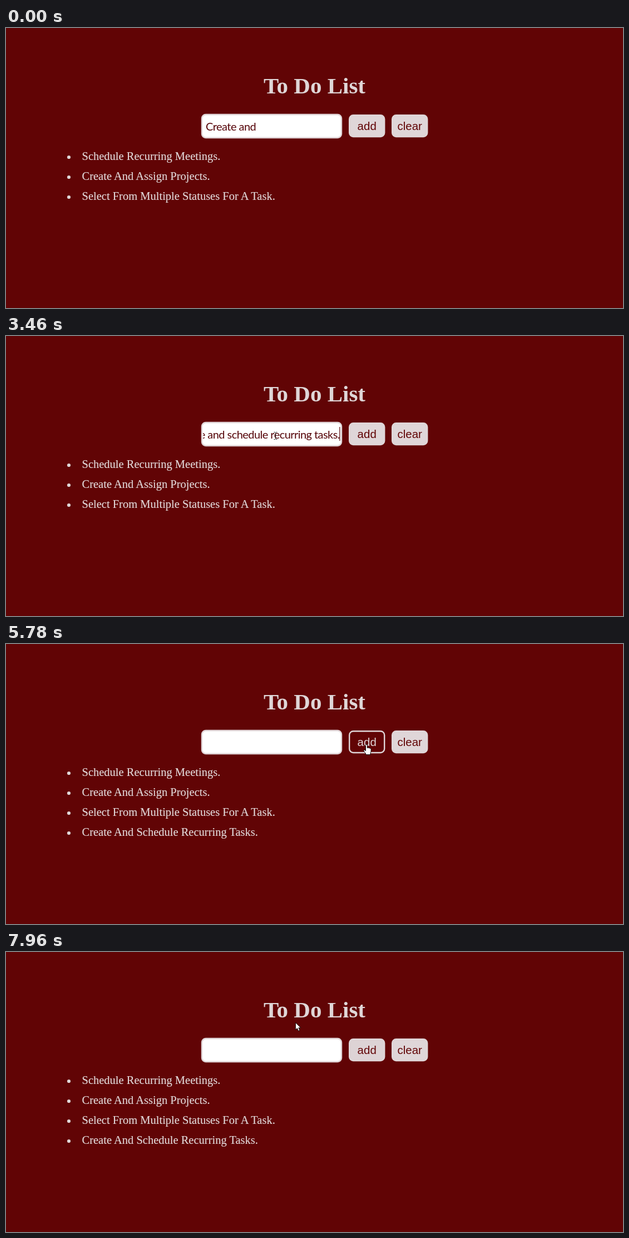
These frames come from a looping animation (1109 px wide and 505 px high, 8000 ms). An HTML page:

```html
<!DOCTYPE html>
<html lang="en">
<head>
<meta charset="utf-8">
<title>To Do List</title>
<style>
  html, body { margin: 0; width: 100%; height: 100%; overflow: hidden; background: #610405; }
  svg { display: block; width: 100vw; height: 100vh; }
  .serif { font: 20.5px "Liberation Serif", "Times New Roman", serif; fill: #e2dadb; stroke: #e2dadb; stroke-width: .15; }
  .title { font-size: 41px; font-weight: bold; fill: #dfd6d7; stroke: none; }
  .button text { font: 20.5px "Liberation Sans", Arial, sans-serif; text-anchor: middle; }
  .button rect { stroke: #dfd6d8; stroke-width: 2.4; }
  .entry { font: 20px Lato, "Open Sans", sans-serif; letter-spacing: -.55px; fill: #560509; }
</style>
</head>
<body>
<svg viewBox="0 0 1109 505">
  <defs>
    <clipPath id="inside"><rect x="354" y="158" width="247" height="38"/></clipPath>
  </defs>
  <rect width="1109" height="505" fill="#610405"/>
  <text class="serif title" x="554.5" y="118" text-anchor="middle">To Do List</text>

  <rect x="352" y="156" width="251" height="42" rx="7" fill="#fff" stroke="#dfd4d6" stroke-width="2.4"/>
  <g clip-path="url(#inside)">
    <text id="start" class="entry" x="359" y="184.5">Create and</text>
    <text id="full" class="entry" x="600" y="184.5" text-anchor="end">Create and schedule recurring tasks.</text>
  </g>
  <rect id="caret" y="164" width="1.2" height="25" fill="#560509"/>

  <g id="buttons"></g>
  <g id="list"></g>

  <g id="pointer">
    <path id="arrow" d="M.5.5V13.2l2.9-2.8L5.5 15.3l2.3-1-2-4.6h4z" fill="#fff" stroke="#000" stroke-width=".8"/>
    <path id="beam" d="M-2.5-6.5h2l1 1 1-1h2M.5-5.5v11M-2.5 6.5h2l1-1 1 1h2" fill="none" stroke="#222"/>
    <path id="hand" d="M-1.5 1.5a1.4 1.4 0 0 1 2.8 0V6.5l1-.2a1.2 1.2 0 0 1 2 .6 1.3 1.3 0 0 1 2 .6 1.2 1.2 0 0 1 1.8 1.2V12q0 2-1.2 4v2.5H-1.2V17L-5 11.8a1.2 1.2 0 0 1 2-1.3l1.5 1.3z" fill="#fff" stroke="#000" stroke-width=".9"/>
  </g>
</svg>
<script>
const LOOP = 8000, TICK = 67, FADE = 300, BLINK = 530;
const ENTER = 460, FOCUS = 1740, PASTE = 3460, BLUR = 5450, SUBMIT = 5580;
const DARK = [97, 4, 5], LIGHT = [223, 214, 216];

const field = { left: 351, right: 604 };
const buttons = ["add", "clear"].map((name, i) =>
  ({ name, left: 616 + 77 * i, right: 681.5 + 77 * i }));
const items = [
  "Schedule Recurring Meetings.",
  "Create And Assign Projects.",
  "Select From Multiple Statuses For A Task.",
  "Create And Schedule Recurring Tasks."
];

// each glide of the pointer bends towards `via` and ends at `to`
const home = [977, 306];
const glides = [
  { begin: ENTER, end: 1130, via: [600, -210], to: [491, 172] },
  { begin: 1270, end: 1800, via: [487, 177], to: [484, 180] },
  { begin: 4700, end: 5220, via: [566, 176], to: [648, 181] },
  { begin: 6500, end: 7000, via: [700, 200], to: [745, 179] },
  { begin: 7340, end: 7900, via: [648, 217], to: [520, 127] }
];

const $ = id => document.getElementById(id);
const show = (id, on) => { $(id).style.display = on ? "" : "none"; };
const clamp = v => Math.min(1, Math.max(0, v));
const easeOut = v => 1 - (1 - v) ** 2.3;
const smooth = v => v * v * (3 - 2 * v);
const mix = (a, b, k) => `rgb(${a.map((v, i) => Math.round(v + (b[i] - v) * k))})`;

$("buttons").innerHTML = buttons.map(({ name, left }) =>
  `<g id="${name}" class="button"><rect x="${left + 1.2}" y="157.2" width="63" height="38.8" rx="7"/>` +
  `<text x="${left + 32.7}" y="183.5">${name}</text></g>`).join("");

$("list").innerHTML = items.map((text, i) => {
  const y = 238 + 36 * i;
  return `<g id="item${i}"><circle cx="113" cy="${y - 5}" r="3.1" fill="#dfd6d7"/>` +
    `<text class="serif" x="136.5" y="${y}">${text}</text></g>`;
}).join("");

function pointerAt(t) {
  let spot = home;
  for (const { begin, end, via, to } of glides) {
    const u = smooth(clamp((t - begin) / (end - begin)));
    spot = spot.map((from, i) =>
      (1 - u) ** 2 * from + 2 * u * (1 - u) * via[i] + u * u * to[i]);
  }
  return spot.map(Math.round);
}

const isOver = ([x, y], { left, right }) =>
  x >= left && x <= right && y >= 155 && y <= 198;

// how far a hover fade has come, summed over the recent pointer positions
function hoverLevel(button, t) {
  const steps = 30;
  let level = 0;
  for (let i = 0; i < steps; i++) {
    if (isOver(pointerAt(t - FADE * i / steps), button))
      level += easeOut((i + 1) / steps) - easeOut(i / steps);
  }
  return level;
}

function caretOn(t) {
  if (t < FOCUS || t >= BLUR) return false;
  const since = t < PASTE ? t - FOCUS : Math.max(0, t - PASTE - 70);
  return Math.floor(since / BLINK) % 2 === 0;
}

function draw(t) {
  show("start", t < PASTE);
  show("full", t >= PASTE && t < SUBMIT);
  show("item3", t >= SUBMIT);
  show("caret", caretOn(t));
  $("caret").setAttribute("x", t < PASTE ? 452 : 599.2);

  const tick = Math.floor(t / TICK) * TICK;
  for (const button of buttons) {
    const level = hoverLevel(button, tick);
    const [box, label] = $(button.name).children;
    box.setAttribute("fill", mix(LIGHT, DARK, level));
    label.setAttribute("fill", mix(DARK, LIGHT, level));
  }

  const spot = pointerAt(tick);
  const kind = isOver(spot, field) ? "beam"
    : buttons.some(b => isOver(spot, b)) ? "hand" : "arrow";
  show("pointer", t >= ENTER);
  for (const id of ["arrow", "beam", "hand"]) show(id, id === kind);
  $("pointer").setAttribute("transform", `translate(${spot})`);
}

const begin = performance.now();
function frame() {
  draw((performance.now() - begin) % LOOP);
  requestAnimationFrame(frame);
}
frame();
</script>
</body>
</html>
```
